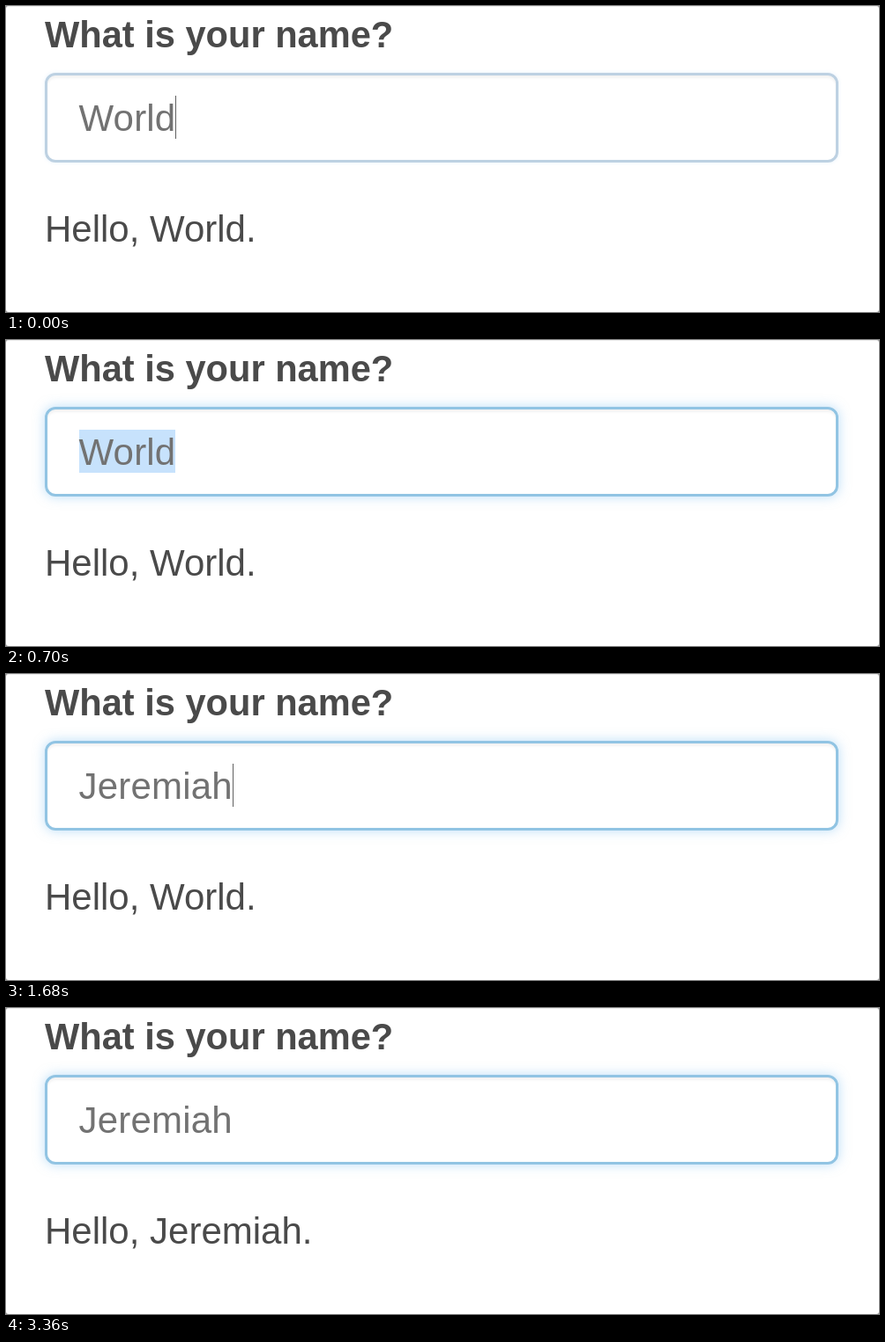
Recreate the animation shown at these times as an HTML page. Size 990 by 348 pixels, loop 3.78 s.

```html
<!DOCTYPE html>
<html lang="en">
<head>
<meta charset="utf-8">
<title>Greeting form</title>
<style>
  html, body { margin: 0; width: 100%; height: 100%; overflow: hidden; background: #999; }
  #stage {
    position: relative; width: 990px; height: 348px; overflow: hidden;
    box-sizing: border-box; border-radius: 3px; border-top: 1px solid #ececec;
    background: #fff; color: #4a4a4a;
    font: 42px/47px "Liberation Sans", Arial, sans-serif;
  }
  #stage > * { position: absolute; margin: 0; white-space: pre; }
  #label { left: 44px; top: 8px; font-weight: bold; font-size: 41.6px; }
  #greeting { left: 44px; top: 229px; }
  #field {
    left: 44px; top: 75px; width: 900px; height: 102px; box-sizing: border-box;
    border: 3px solid #bdd1e2; border-radius: 12px;
    box-shadow: inset 0 3px 3px rgba(0, 0, 0, .05), 0 0 4px rgba(130, 190, 240, .2);
  }
  #field.focus {
    border-color: #91c4e3;
    box-shadow: inset 0 3px 3px rgba(0, 0, 0, .05), 0 0 13px rgba(120, 190, 242, .5);
  }
  #entry { left: 82.5px; top: 101px; padding-top: 2px; color: #727272; letter-spacing: .2px; }
  #entry.selected { background: #c7e2fc; }
  #entry.caret::after {
    content: ""; position: absolute; left: 100%; top: 0;
    width: 1px; height: 49px; background: #606060;
  }
</style>
</head>
<body>
<div id="stage">
  <p id="label">What is your name?</p>
  <div id="field"></div>
  <span id="entry" class="caret">World</span>
  <p id="greeting">Hello, World.</p>
</div>
<script>
  const LOOP = 3780;
  const NAME = "Jeremiah";
  const [field, entry, greeting] = ["field", "entry", "greeting"].map(id => document.getElementById(id));

  const typed = count => ({ text: NAME.slice(0, count), mark: "caret" });

  // Each step lists only what changes from the one before.
  const steps = [
    [0, { text: "World", mark: "caret", focus: false, greet: "World" }],
    [70, { focus: true }],
    [490, { mark: "" }],
    [700, { mark: "selected" }],
    [1050, typed(1)],
    [1260, typed(2)],
    [1330, typed(4)],
    [1400, typed(5)],
    [1470, typed(6)],
    [1610, typed(7)],
    [1680, typed(8)],
    [2170, { greet: NAME }],
    [2240, { mark: "" }],
    [2730, { mark: "caret" }],
    [3220, { mark: "" }]
  ];

  const stateAt = time => Object.assign({},
    ...steps.filter(([start]) => start <= time).map(([, change]) => change));

  function render(time) {
    const state = stateAt(time % LOOP);
    entry.textContent = state.text;
    entry.className = state.mark;
    field.className = state.focus ? "focus" : "";
    greeting.textContent = `Hello, ${state.greet}.`;
  }

  const begin = performance.now();
  function tick() {
    render(performance.now() - begin);
    requestAnimationFrame(tick);
  }
  tick();
</script>
</body>
</html>
```
